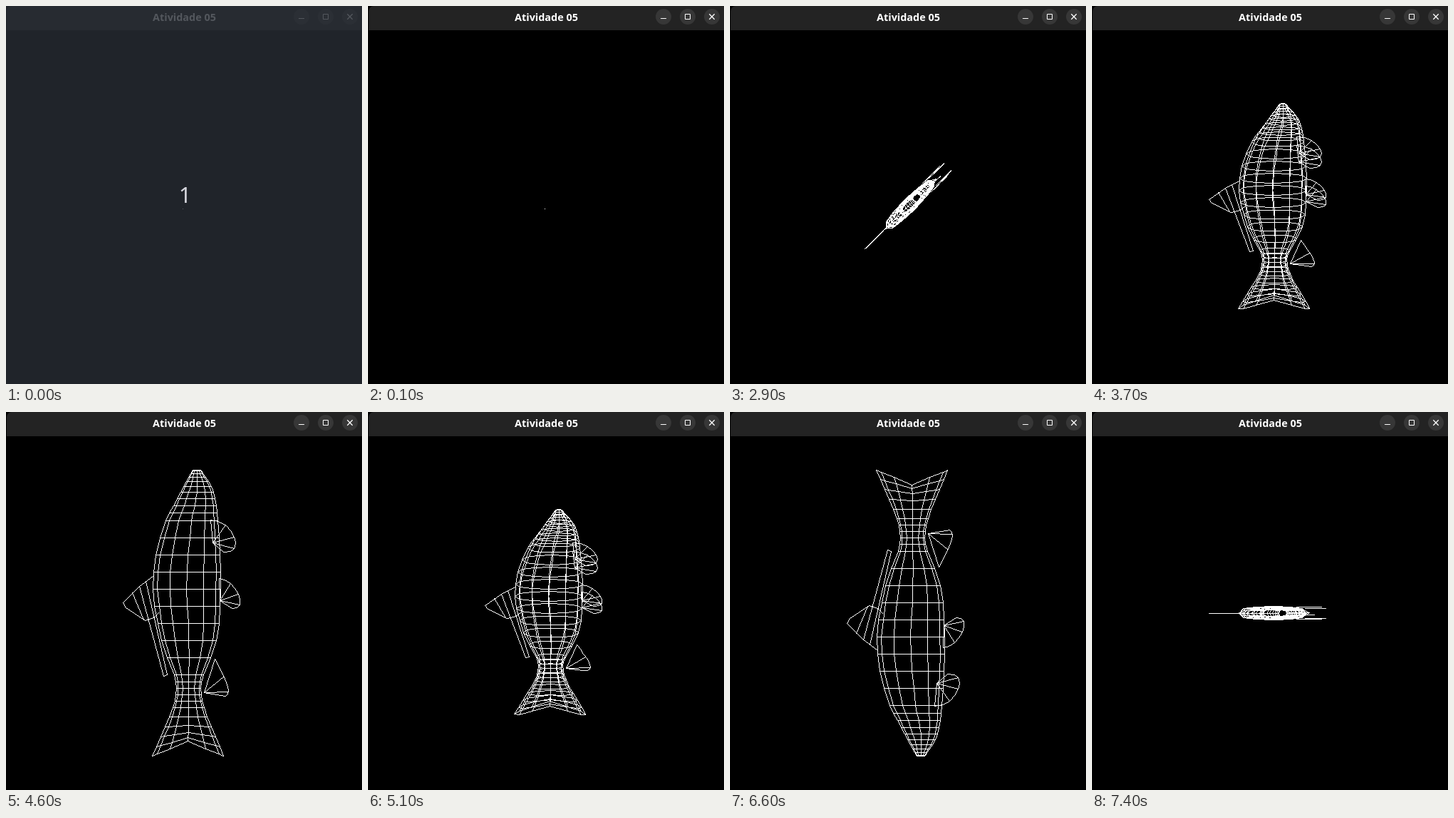
Animation of 500x530 px, one loop 8000 ms. Source, as an HTML page with a canvas:

```html
<!DOCTYPE html>
<html lang="pt">
<head>
<meta charset="utf-8">
<title>Atividade 05</title>
<style>
html, body { margin: 0; width: 100%; height: 100%; overflow: hidden; background: #000; }
#stage { position: absolute; left: 0; top: 0; width: 500px; height: 530px; overflow: hidden; }
canvas, svg { position: absolute; left: 0; top: 0; }
#bar {
  position: absolute; left: 1px; top: 0; width: 499px; height: 34px;
  border-top-left-radius: 7px; background: #232323;
}
#bar svg { left: -1px; }
text { font-family: "Noto Sans", "Open Sans", sans-serif; text-anchor: middle; }
#bar text { font-size: 14.4px; font-weight: 700; fill: #fff; }
#shade { position: absolute; inset: 0; background: rgba(41, 45, 53, .8); }
#shade text { font-size: 31px; fill: #d6d7de; }
</style>
</head>
<body>
<div id="stage">
  <canvas id="view" width="500" height="530"></canvas>
  <div id="bar">
    <svg width="500" height="34">
      <text x="250.5" y="21">Atividade 05</text>
      <g fill="#373737">
        <circle cx="415" cy="15" r="11"/><circle cx="449" cy="15" r="11"/><circle cx="483" cy="15" r="11"/>
      </g>
      <g fill="none" stroke="#fff">
        <path d="M411 17.5h8M445.5 11.5h7v7h-7z"/>
        <path d="M479.3 11.3l7.4 7.4m0-7.4l-7.4 7.4" stroke-width="1.3"/>
      </g>
    </svg>
  </div>
  <div id="shade"><svg width="500" height="530"><text x="251.5" y="276">1</text></svg></div>
</div>
<script>
const LOOP = 8000, SIDES = 12, AXIS = [246.5, 281.5];
const NOSE = 139.5, TAIL = 375, END = 423.5;
const ctx = document.getElementById('view').getContext('2d');
const shade = document.getElementById('shade');

// each key press doubles the scale, then rolls or pitches by 45 degrees
const presses = [0, 400, 700, 1000, 1100, 1600, 2100, 2900,
  3400, 3700, 4600, 5100, 5600, 6100, 6600, 7000, 7400];

function pose(i) {
  const quarter = Math.min(1, Math.max(0, (8 - i) / 2));
  return {
    scale: 2 ** Math.min(0, 2 * i - 8, i - 6),
    roll: quarter * Math.PI / 2,
    pitch: Math.max(0, i - 8) * Math.PI / 4,
    ox: AXIS[0] + 1.2 * quarter,
    oy: AXIS[1] + 2.4 * quarter
  };
}

// body as seen tilted by 45 degrees: y, centre, half width, half depth
const keys = [
  [NOSE, 267.5, 5.5, 5], [160, 268, 22, 7], [195, 259.5, 38, 9], [250, 253.5, 47.5, 9.5],
  [310, 256.5, 38.5, 8.5], [358, 256, 17, 5], [END, 255.3, 50, 5]
];

// smooth curve through the keys
function profile(y, column) {
  const last = keys.length - 1;
  let i = 0;
  while (i < last - 1 && y > keys[i + 1][0]) i++;
  const slope = n => {
    const a = keys[Math.max(0, n - 1)], b = keys[Math.min(last, n + 1)];
    return (b[column] - a[column]) / (b[0] - a[0]);
  };
  const a = keys[i], b = keys[i + 1], h = b[0] - a[0], k = (y - a[0]) / h, j = 1 - k;
  return a[column] * j * j * (1 + 2 * k) + b[column] * k * k * (1 + 2 * j)
    + h * k * j * (slope(i) * j - slope(i + 1) * k);
}

const point = (x, y, d) => [x - AXIS[0], (y - AXIS[1]) * Math.SQRT2, d];

function ring(y) {
  const [centre, half, depth] = [1, 2, 3].map(column => profile(y, column));
  const notch = 15 * (Math.max(0, y - TAIL) / (END - TAIL)) ** 2.5;
  return Array.from({ length: SIDES }, (_, n) => {
    const angle = n * 2 * Math.PI / SIDES, c = Math.cos(angle), s = Math.sin(angle);
    return point(centre + c * half, y - notch * (1 - Math.abs(c)),
      depth * Math.sign(s) * Math.abs(s) ** .6);
  });
}

const spread = (from, to, count, power = 1) =>
  Array.from({ length: count }, (_, i) => from + (to - from) * (i / count) ** power);

const body = [
  ...spread(NOSE, 190, 10, 1.6), ...spread(190, 343, 9),
  ...spread(343, TAIL, 5), ...spread(TAIL, END, 5), END
].map(ring);
const paths = body.map(r => [...r, r[0]]);
for (let n = 0; n < SIDES; n++) paths.push(body.map(r => r[n]));

const flat = (points, depth) => paths.push(points.map(([x, y]) => point(x, y, depth)));

// curved edge around a root, with ribs running to the root
function fan(depth, root, edge, ribs) {
  const at = t => [0, 1].map(c => {
    const [a, b, d, e] = edge.map(p => p[c]), j = 1 - t;
    return a * j ** 3 + 3 * b * j * j * t + 3 * d * j * t * t + e * t ** 3;
  });
  flat([root, ...Array.from({ length: 9 }, (_, i) => at(i / 8)), root], depth);
  for (let i = 1; i <= ribs; i++) flat([root, at(i / (ribs + 1))], depth);
}

for (const side of [-1, 1]) {
  fan(side * 8.5, [290, 212], [[287, 189], [318, 189], [338, 224], [305, 221]], 3);
  fan(side * 7, [300, 269], [[299, 247], [322, 247], [342, 279], [317, 277]], 3);
}
fan(2, [278, 360], [[293, 327], [305, 343], [323, 368], [302, 363]], 2);

// dorsal fin
flat([[206, 245], [187, 255], [164, 271], [168, 276], [195, 289], [207, 286], [214, 281]], 0);
flat([[177, 261], [193, 288]], 0);
flat([[187, 255], [221, 344], [226, 343], [196, 250]], 0);

function project([w, l, d], { scale, roll, pitch, ox, oy }) {
  const h = d * Math.cos(pitch) + l * Math.sin(pitch);
  const c = Math.cos(roll), s = Math.sin(roll);
  return [
    Math.round(ox + scale * (w * c + h * s)),
    Math.round(oy + scale * (h * c - .99 * w * s))
  ];
}

// hard-edged line, one pixel wide
function line([x0, y0], [x1, y1]) {
  const n = Math.max(Math.abs(x1 - x0), Math.abs(y1 - y0));
  for (let i = 0; i <= n; i++) {
    const k = n ? i / n : 0;
    ctx.fillRect(Math.round(x0 + (x1 - x0) * k), Math.round(y0 + (y1 - y0) * k), 1, 1);
  }
}

function draw(view) {
  ctx.fillStyle = '#000';
  ctx.fillRect(0, 0, 500, 530);
  ctx.fillStyle = '#fff';
  for (const path of paths) {
    const dots = path.map(p => project(p, view));
    for (let i = 1; i < dots.length; i++) line(dots[i - 1], dots[i]);
  }
}

const start = performance.now();
let shown;
function tick() {
  const t = (performance.now() - start) % LOOP;
  shade.style.display = t < 100 ? 'block' : 'none';
  const step = presses.filter(p => p <= t).length - 1;
  if (step !== shown) draw(pose(shown = step));
  requestAnimationFrame(tick);
}
tick();
</script>
</body>
</html>
```
